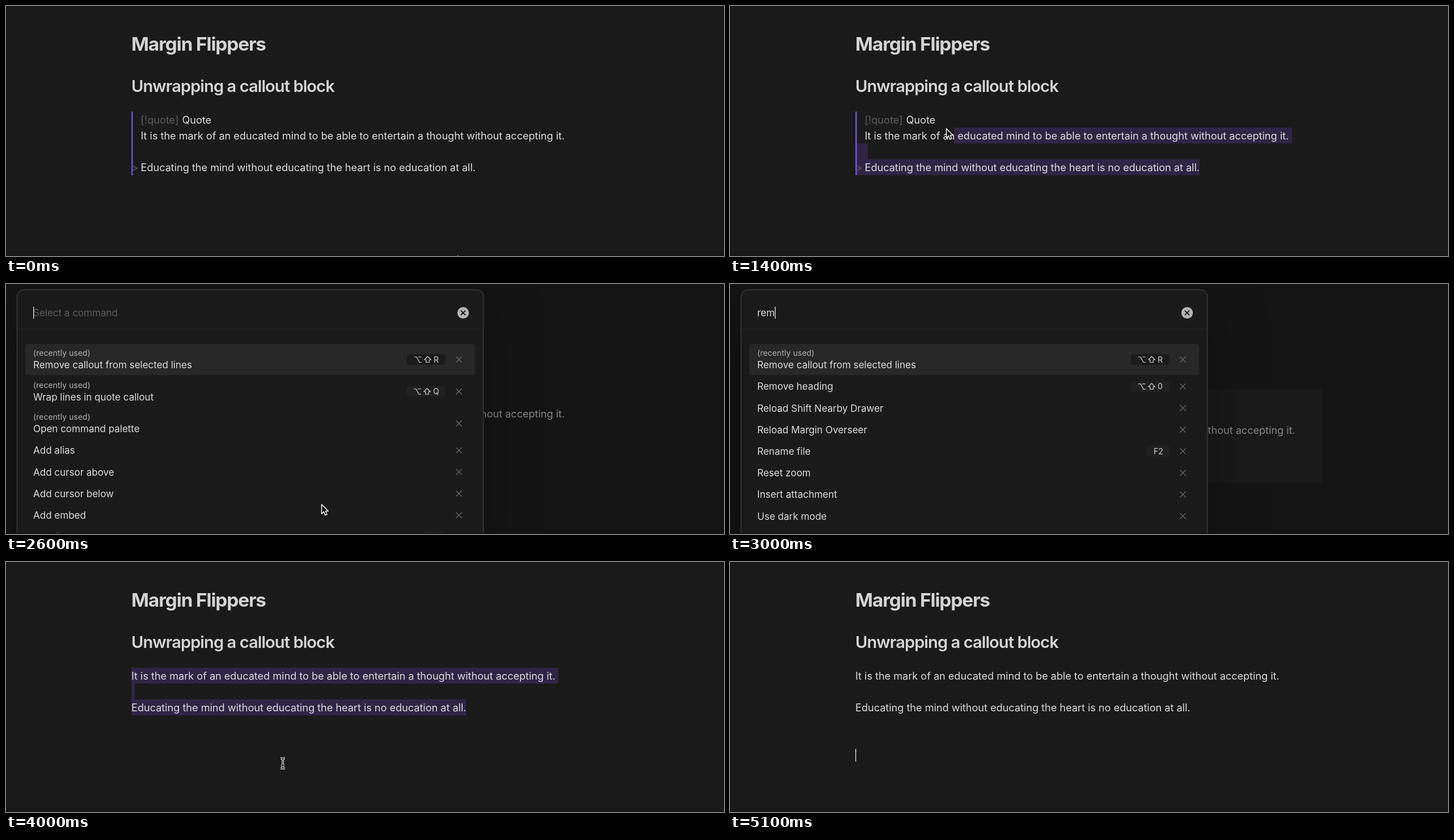
An HTML page for the animation above (5.5 s loop, 1266x442 px).

```html
<!DOCTYPE html>
<html lang="en">
<head>
<meta charset="utf-8">
<title>Unwrapping a callout block</title>
<style>
  html, body { margin: 0; width: 100%; height: 100%; overflow: hidden; background: #1a1a1a; }
  svg { display: block; width: 1266px; height: 442px; }
  text {
    font-family: Inter, "Open Sans", sans-serif;
    font-optical-sizing: none;
    letter-spacing: -.003em;
    white-space: pre;
  }
  .h1 { font-size: 33.3px; font-weight: 700; letter-spacing: -1.1px; }
  .h2 { font-size: 29.1px; font-weight: 600; letter-spacing: -.94px; }
  .body { font-size: 18.2px; }
  .item { font-size: 17.1px; }
  .note { font-size: 13.8px; letter-spacing: .15px; }
  .key { font-size: 14px; }
  .modal { filter: drop-shadow(0 20px 50px rgba(0, 0, 0, .25)); }
</style>
</head>
<body>
<svg id="stage" viewBox="0 0 1266 442"></svg>
<script>
const LOOP = 5500, STEP = 100;
const BG = '#1a1a1a', INK = '#dadada', FAINT = '#5c5c5c', PICK = '#2e2545';
const LINES = [
  'It is the mark of an educated mind to be able to entertain a thought without accepting it.',
  'Educating the mind without educating the heart is no education at all.'
];

// Pointer path: time, x, y
const PATH = [
  [0, 796, 441], [200, 715, 392], [300, 690, 345], [500, 800, 285], [600, 831, 275],
  [700, 838, 291], [800, 841, 282], [900, 815, 283], [1000, 760, 262], [1100, 690, 240],
  [1200, 623, 228], [1400, 381, 216], [1500, 295, 205], [1600, 238, 198], [1800, 238, 198],
  [2000, 300, 225], [2300, 530, 370], [2400, 556, 389], [2800, 556, 389],
  [3800, 552, 388], [4000, 488, 356], [4200, 400, 342], [4500, 400, 342],
  [4800, 640, 372], [5000, 1028, 410], [LOOP, 1028, 410]
];

const OPEN_LIST = [
  ['Remove callout from selected lines', 'R', 1], ['Wrap lines in quote callout', 'Q', 1],
  ['Open command palette', '', 1], ['Add alias'], ['Add cursor above'],
  ['Add cursor below'], ['Add embed'], ['Add file property', '⌘ ;']
];
const FOUND_LIST = [
  OPEN_LIST[0], ['Remove heading', '0'], ['Reload Shift Nearby Drawer'],
  ['Reload Margin Overseer'], ['Rename file', 'F2'], ['Reset zoom'],
  ['Insert attachment'], ['Use dark mode'], ['Move current file to another folder']
];

const text = (x, y, cls, str, fill = INK) =>
  `<text x="${x}" y="${y}" class="${cls}" fill="${fill}">${str}</text>`;
const rect = (x, y, x2, y2, fill, r = 0) =>
  `<rect x="${x}" y="${y}" width="${x2 - x}" height="${y2 - y}" rx="${r}" fill="${fill}"/>`;
const line = (d, stroke, width, fill = 'none') =>
  `<path d="${d}" stroke="${stroke}" stroke-width="${width}" fill="${fill}" stroke-linejoin="round"/>`;
const cross = (x, y, r, stroke, width) =>
  line(`M${x - r} ${y - r}l${2 * r} ${2 * r}m0 ${-2 * r}l${-2 * r} ${2 * r}`, stroke, width);
const caret = (x, y, h) => rect(x, y, x + 1.3, y + h, '#e4e4e4');

function pointerAt(t) {
  const i = PATH.findIndex(p => p[0] > t);
  const [t0, x0, y0] = PATH[i - 1], [t1, x1, y1] = PATH[i];
  const k = (t - t0) / (t1 - t0);
  return [x0 + (x1 - x0) * k, y0 + (y1 - y0) * k];
}

function pointer(t) {
  if (t >= 2900 && t < 3800 || t >= 5100) return '';
  const [x, y] = pointerAt(t);
  const beam = 'M-4-9.3Q0-9.3 0-6V6Q0 9.3-4 9.3M4-9.3Q0-9.3 0-6M0 6Q0 9.3 4 9.3M-2.5 3.5H2.5';
  const shape = t < 3000
    ? line('M.5.8V17.2L4.4 13.6L7 19.7L9.9 18.5L7.4 12.5H12.3Z', '#f2f2f2', 1.5, '#141414')
    : line(beam, '#f2f2f2', 3.6) + line(beam, '#141414', 1.3);
  return `<g transform="translate(${x} ${y})">${shape}</g>`;
}

// Selection runs from the pointer to the end of the last line
function dragSelection(t) {
  if (t < 900) return '';
  const [px, y] = pointerAt(Math.min(t, 1600));
  const x = px + 14;
  if (y > 271) return rect(px, 271, 828, 299, PICK);
  let out = rect(223, 243, 243, 271, PICK) + rect(223, 271, 828, 299, PICK);
  if (y < 243) out += rect(y < 210 ? 223 : x, 215, 991, 243, PICK);
  if (y < 210) out += rect(t < 1600 ? x : 238, 187, 369, 215, PICK);
  return out;
}

const headings = () =>
  text(221, 78.7, 'h1', 'Margin Flippers', '#d4d4d4') +
  text(221, 151.5, 'h2', 'Unwrapping a callout block', '#d4d4d4');

const quoteDoc = selection =>
  headings() + selection + rect(221.2, 186.5, 223.6, 299, '#7852ee') +
  text(237.5, 207.6, 'body', '[!quote]', FAINT) + text(310.5, 207.6, 'body', 'Quote') +
  text(237.5, 235.8, 'body', LINES[0]) +
  text(221.5, 292.2, 'body', '&gt;', FAINT) + text(237.5, 292.2, 'body', LINES[1]);

const plainDoc = selected =>
  headings() +
  (selected ? rect(221, 187, 974, 215, PICK) + rect(221, 215, 227, 243, PICK) +
    rect(221, 243, 811, 271, PICK) : '') +
  text(221, 207.6, 'body', LINES[0]) + text(221, 264, 'body', LINES[1]);

function hotkey(label, y, active) {
  const combo = label.length === 1;
  const left = combo ? (label === 'Q' ? 706 : 707) : 735;
  let out = rect(left, y - 9.5, 775, y + 9.5, active ? '#1b1b1b' : '#202020', 4);
  if (combo) {
    out += line(`M${left + 13} ${y - 4.5}h4l5 9.5h4m-6-9.5h5.5`, '#cfcfcf', 1.2);
    out += line(`M${left + 36.5} ${y - 5.5}l5.8 6h-3v4.5h-5.6v-4.5h-3z`, '#cfcfcf', 1.2);
  }
  return out + text(combo ? left + 47 : 747, y + 5, 'key', label, '#cfcfcf');
}

function modal(list, query) {
  let out = rect(19.5, 10, 842, 500, BG, 12) +
    '<rect x="19.5" y="10" width="822.3" height="490" rx="12" fill="none" stroke="#4c4c4c"/>' +
    rect(20, 79, 841.5, 80, '#222') +
    text(48, 57.3, 'item', query || 'Select a command', query ? INK : FAINT) +
    caret(query ? (query.length > 2 ? 79 : 64) : 48, 40, 21.5) +
    '<circle cx="806" cy="51" r="10.2" fill="#b3b3b3"/>' + cross(806, 51, 4, BG, 1.9) +
    rect(34, 106, 827, 161, '#272727', 5);
  let top = 105.5;
  list.forEach(([name, keys, recent], i) => {
    const height = recent ? 56.5 : 38.2;
    const mid = top + (recent ? 28 : height / 2);
    if (recent) out += text(48, top + 21.6, 'note', '(recently used)', '#b3b3b3');
    out += text(48, recent ? top + 43.8 : mid + 6.2, 'item', name);
    if (keys) out += hotkey(keys, mid, !i);
    out += cross(798.5, mid, 5.2, '#676767', 1.3);
    top += height;
  });
  return `<g class="modal">${out}</g>`;
}

function scene(t) {
  let out;
  if (t < 2500) {
    out = quoteDoc(dragSelection(t)) + (t >= 700 && t < 900 ? caret(827.3, 274, 23) : '');
  } else if (t < 3400) {
    const folded = t >= 2700;
    const query = t < 2900 ? '' : t < 3000 ? 're' : 'rem';
    out = rect(0, 0, 1266, 442, '#141414') +
      (folded ? rect(221, 186, 1045, 352, '#191919', 5) : '') +
      text(folded ? 249 : 237.5, folded ? 265 : 235.8, 'body', LINES[0], '#858585') +
      modal(query ? FOUND_LIST : OPEN_LIST, query);
  } else {
    out = plainDoc(t < 4200) + (t >= 4200 ? caret(221, 330.5, 22.5) : '');
  }
  return out + rect(0, 440, 1266, 442, '#151314') + pointer(t);
}

const stage = document.getElementById('stage');
let shown = -1;
function tick() {
  const t = Math.floor(performance.now() % LOOP / STEP) * STEP;
  if (t !== shown) stage.innerHTML = scene(shown = t);
  requestAnimationFrame(tick);
}
tick();
</script>
</body>
</html>
```
